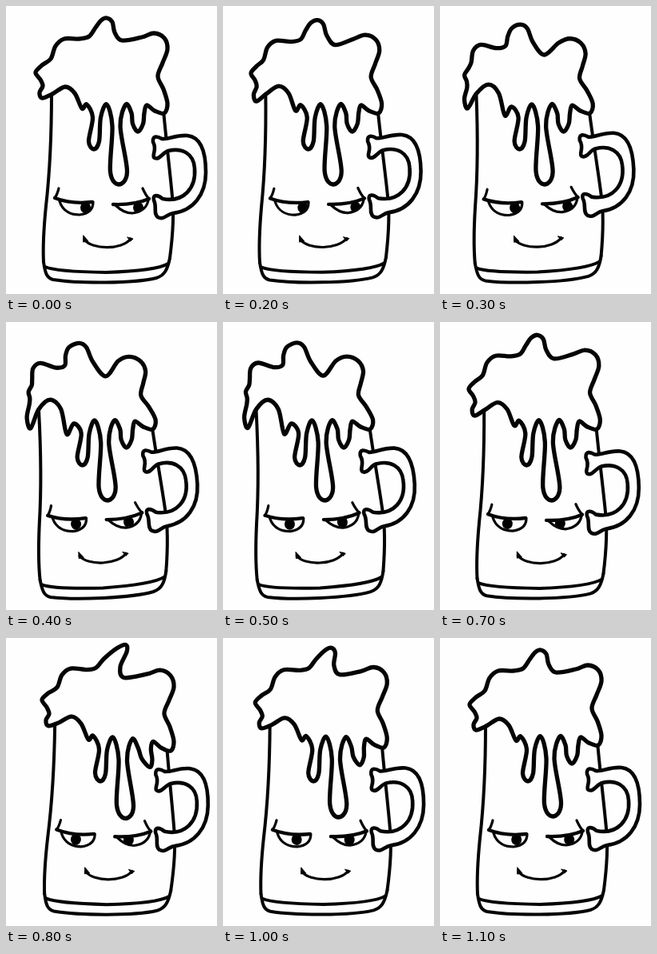
Write an HTML page that moves like this. It is 264 by 360 pixels and loops after 1.2 s.

```html
<!DOCTYPE html>
<html lang="en">
<head>
<meta charset="utf-8">
<title>Smirking mug</title>
<style>
  html, body { margin: 0; width: 100%; height: 100%; overflow: hidden; background: #fefefe; }
  svg { display: block; width: 100vw; height: 100vh; }
  path { fill: none; stroke: #050505; stroke-width: 4; stroke-linecap: round; stroke-linejoin: round; }
  .solid { fill: #fefefe; }
  .lid { stroke-width: 4.3; }
  .thin { stroke-width: 3.2; }
  .ink { fill: #050505; stroke-width: 1; }
  #handle { stroke-width: 4.6; }
  #foam { stroke-width: 5.3; }
</style>
</head>
<body>
<svg viewBox="0 0 264 360">
  <defs>
    <clipPath id="eyes">
      <path d="M66 242Q86 248 109 245Q110 258 92 261Q70 260 66 242Z"/>
      <path d="M136 249Q160 248 178 242Q177 258 158 259Q143 257 136 249Z"/>
    </clipPath>
  </defs>
  <g id="mug">
    <path d="M57 108C57 170 54 215 50 250C47 280 46 300 47 320"/>
    <path d="M197 130C200 165 205 205 208 238C211 265 208 292 205 315"/>
    <path d="M47 320C49 334 51 340 59 342C90 347 160 347 188 340C198 337 202 330 205 315"/>
    <path d="M49 326Q62 332 125 333Q188 331 203 322"/>
    <path id="handle" class="solid" d="M184 170C183 161 190 163 195 166C203 167 212 161 227 162C245 164 250 184 250 208C250 236 234 256 209 259C201 260 198 268 190 264C184 260 189 250 185 243C183 235 190 236 196 241C222 246 238 228 236 203C235 184 220 177 203 181C196 183 192 193 186 190C181 187 190 181 184 170Z"/>
    <g clip-path="url(#eyes)">
      <g id="pupils">
        <ellipse cx="102" cy="252" rx="6.5" ry="7"/>
        <ellipse cx="168" cy="252" rx="6.5" ry="7"/>
      </g>
    </g>
    <path class="thin" d="M67 244C71 257 82 261 92 261Q109 259 109 245"/>
    <path class="thin" d="M137 249C145 257 152 259 158 259Q175 257 178 243"/>
    <path class="lid" d="M61 240Q82 248 108 245"/>
    <path class="lid" d="M134 248Q160 249 179 241"/>
    <path class="thin" d="M66 228Q64 236 61 240"/>
    <path class="thin" d="M171 228Q175 237 179 241"/>
    <path class="thin" d="M98 292C108 305 145 305 156 291"/>
    <path class="ink" d="M97 287L103 294L97 295Z"/>
    <path class="ink" d="M152 289L159 291L156 294Z"/>
  </g>
  <path id="foam" class="solid"/>
</svg>
<script>
// Foam at rest, clockwise from the small bump on the left to the right lobe.
const crown = `95,128 86,109 74,101 58,110 45,115 42,108 46,100 43,92 37,83 45,74 56,66
  62,50 73,41 92,41 104,38 112,27 119,18 126,15 133,20 136,33 145,43 170,39 185,34
  198,40 202,54 196,71 190,88 197,104 202,122 198,134 186,131 176,124`
  .split(/\s+/).map(p => p.split(',').map(Number));

// A drip hangs from a narrow neck and swells above its tip.
function drip(neckX, tipX, tipY, narrow, wide, valley) {
  const neckY = 126 + (tipY - 126) / 4, bellyY = tipY - 1.5 * wide;
  return [[neckX + narrow, neckY], [tipX + wide, bellyY], [tipX, tipY],
    [tipX - wide, bellyY], [neckX - narrow, neckY], [valley, 123]];
}
const outline = [...crown,
  ...drip(165, 165, 157, 8, 6.5, 150),
  ...drip(138, 141, 223, 5, 10.5, 126),
  ...drip(113.5, 110, 179, 5, 6.5, 101)];

// Soft local pulls on the foam: centre x, y, reach, then the shift.
const leftPulls = [
  [145, 43, 15, 9, 16], [98, 40, 20, 0, 8], [115, 20, 10, -9, 3], [40, 80, 15, 14, 0],
  [43, 114, 8, 2, 18], [70, 104, 14, 0, -7], [93, 127, 8, -5, 13]];
const rightPulls = [[126, 15, 14, 16, -8], [150, 43, 20, -6, 4], [165, 157, 14, 7, 0]];

function pull(list, x, y, dx, dy) {
  for (const [cx, cy, reach, px, py] of list) {
    const w = Math.exp(-((x - cx) ** 2 + (y - cy) ** 2) / reach ** 2);
    dx += px * w;
    dy += py * w;
  }
  return [dx, dy];
}

// Leaning left bends the top further than the drips; leaning right tilts it.
function sway([x, y], left, right) {
  const h = Math.min(1, Math.max(0, (125 - y) / 100));
  const a = pull(leftPulls, x, y, -14 - 18 * h, 10 * h);
  const b = pull(rightPulls, x, y, 8, (x - 110) * .08);
  return [x + left * a[0] + right * b[0], y + left * a[1] + right * b[1]];
}

// Closed smooth curve through all points.
function smooth(p) {
  const n = p.length, at = i => p[(i + n) % n];
  let d = 'M' + p[0];
  for (let i = 0; i < n; i++) {
    const a = at(i - 1), b = at(i), c = at(i + 1), e = at(i + 2);
    const c1 = b.map((v, m) => v + (c[m] - a[m]) / 6);
    const c2 = c.map((v, m) => v - (e[m] - b[m]) / 6);
    d += `C${c1} ${c2} ${c}`;
  }
  return d + 'Z';
}

const loop = 1200, step = 100;
const el = id => document.getElementById(id);
const mug = el('mug'), pupils = el('pupils'), foam = el('foam');

// Rises from 0 to 1 and falls back; a skew below 1 makes the rise quicker.
function bump(t, from, to, skew = 1) {
  const u = Math.min(1, Math.max(0, (t - from) / (to - from)));
  return Math.sin(Math.PI * u ** skew);
}

function pose(t) {
  const left = 1.05 * bump(t, 160, 720), right = bump(t, 700, 1100, .5);
  const lean = 4 * right - 15 * left;
  const look = 8.5 * (Math.cos(2 * Math.PI * (t - 150) / loop) - 1);
  foam.setAttribute('d', smooth(outline.map(p => sway(p, left, right))));
  const m = [1, .0025 * lean, -.00356 * lean, 1, 1.427 * lean, -.275 * lean];
  mug.setAttribute('transform', `matrix(${m.map(v => v.toFixed(5))})`);
  pupils.setAttribute('transform', `translate(${look.toFixed(2)} 0)`);
}

let shown = -1;
function tick() {
  const t = Math.floor(performance.now() % loop / step) * step;
  if (t !== shown) pose(shown = t);
  requestAnimationFrame(tick);
}
tick();
</script>
</body>
</html>
```
